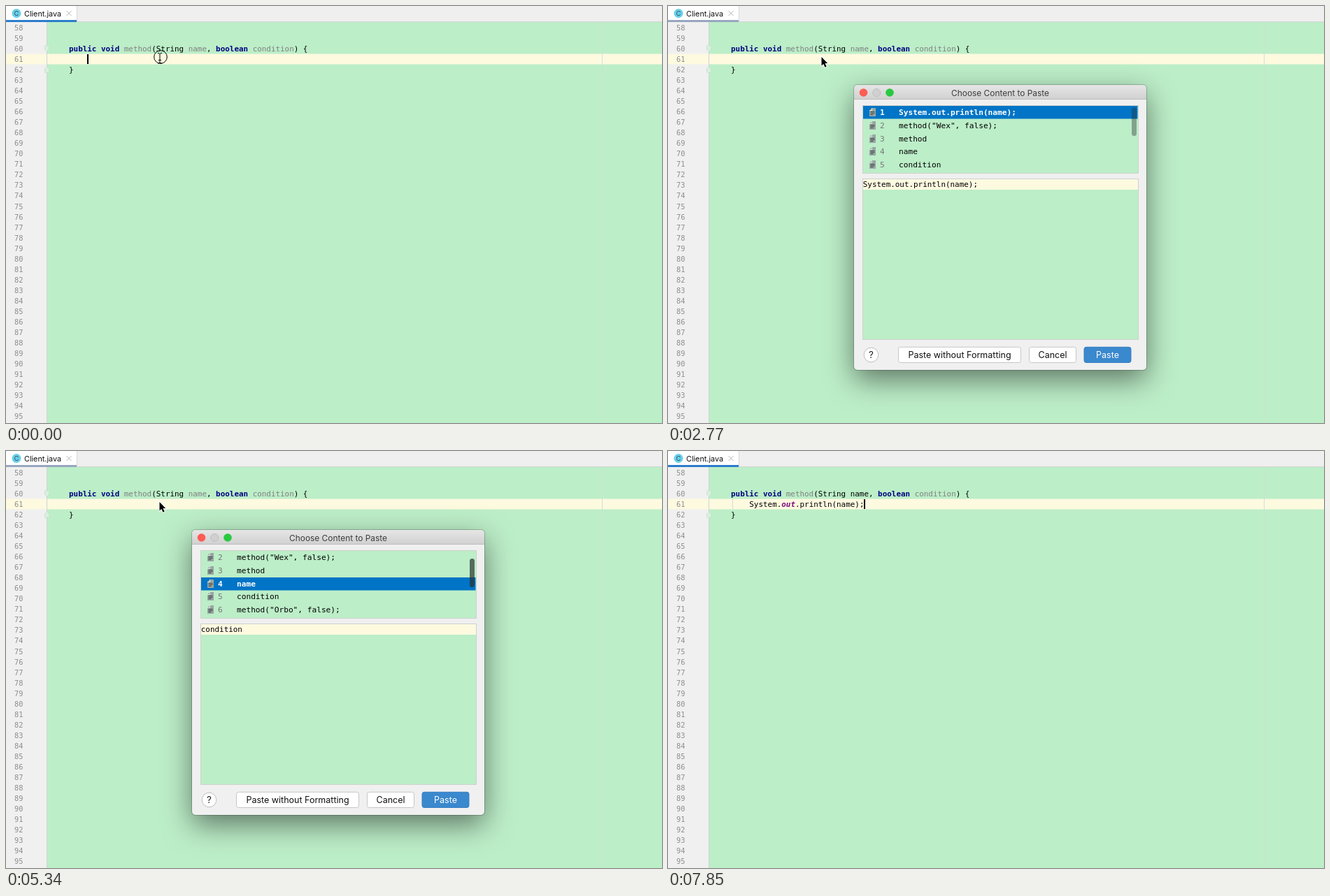
An HTML page with a canvas for the animation above (8 s loop, 938x597 px).

```html
<!DOCTYPE html>
<html lang="en">
<head>
<meta charset="utf-8">
<title>Paste from history</title>
<style>
  html, body { margin: 0; width: 100%; height: 100%; overflow: hidden; background: #bceec8; }
  canvas { display: block; }
</style>
</head>
<body>
<canvas id="stage" width="938" height="597"></canvas>
<script>
const LOOP = 8000, LAG = 90, BLINK = 540;
const W = 938, H = 597, LINE = 15.03, ROW = 18.75, VISIBLE = 5;
const MONO = '"DejaVu Sans Mono", monospace';
const UI = 'Inter, sans-serif';
const CODE = 10.92, LIST = 11.16;
const GREEN = '#bceec8', YELLOW = '#fefae0', GRAY = '#808080', NAVY = '#000080';

// Key moments of the story, in ms.
const OPEN = 1610, FILLED = 1780, LEAVE = 6930, CLOSED = 7110;
const PASTED = 7380, RESOLVED = 7500, POINTER_HIDDEN = 7770;
const DOWN = [2950, 3220, 3480, 3570, 3740];
const UP = [4900, 5340, 5510, 5690, 5860];

const ITEMS = [
  'System.out.println(name);', 'method("Wex", false);', 'method',
  'name', 'condition', 'method("Orbo", false);'
];

const screen = document.getElementById('stage').getContext('2d');
const layer = document.createElement('canvas');
layer.width = W;
layer.height = H;
const layerCtx = layer.getContext('2d');
let g = screen;

function selection(t) {
  const count = keys => keys.filter(key => key <= t).length;
  return count(DOWN) - count(UP);
}

// The list scrolls only as far as the selection pushes it.
function firstRow(t) {
  let first = 0;
  for (const key of [...DOWN, ...UP]) {
    if (key > t) break;
    const row = selection(key);
    first = Math.min(row, Math.max(first, row - VISIBLE + 1));
  }
  return first;
}

// The scroll thumb dims for a moment before it goes.
function thumbOpacity(t) {
  const spans = [[FILLED, 2860], [DOWN[4], 4360], [UP[1], 6570]];
  const span = spans.find(([from, to]) => t >= from && t < to);
  if (!span) return 0;
  return t < span[1] - LAG ? .7 : .4;
}

function dialogOpacity(t) {
  if (t < OPEN || t >= CLOSED) return 0;
  return Math.min(t - OPEN, CLOSED - LAG - 1 - t) < LAG && (t < OPEN + LAG || t >= CLOSED - LAG) ? .5 : 1;
}

function caretOn(t) {
  if (t >= CLOSED) return true;
  return t < OPEN && (t + BLINK / 2) % (2 * BLINK) < BLINK;
}

function rect(x, y, w, h, color) {
  g.fillStyle = color;
  g.fillRect(x, y, w, h);
}

function box(x, y, w, h, r, fill, stroke) {
  g.beginPath();
  g.roundRect(x, y, w, h, r);
  if (fill) { g.fillStyle = fill; g.fill(); }
  if (stroke) { g.strokeStyle = stroke; g.lineWidth = 1; g.stroke(); }
}

function disc(x, y, r, fill, stroke) {
  box(x - r, y - r, 2 * r, 2 * r, r, fill, stroke);
}

function shape(d, x, y, { fill, stroke, width = 1 }) {
  const path = new Path2D(d);
  g.save();
  g.translate(x, y);
  g.lineJoin = 'round';
  if (stroke) { g.strokeStyle = stroke; g.lineWidth = width; g.stroke(path); }
  if (fill) { g.fillStyle = fill; g.fill(path); }
  g.restore();
}

function text(str, x, y, size, color, { family = MONO, style = '', align = 'left' } = {}) {
  g.font = `${style} ${size}px ${family}`;
  g.textAlign = align;
  g.fillStyle = color;
  g.fillText(str, x, y);
  return x + g.measureText(str).width;
}

// Each part is [string, color, style].
function code(parts, x, y) {
  for (const [str, color = '#000', style] of parts) x = text(str, x, y, CODE, color, { style });
}

function tabBar(active) {
  rect(0, 0, W, 23, '#efefef');
  rect(0, 22, W, 1, '#d4d4d4');
  rect(0, 0, 101, 22, '#ffffff');
  rect(101, 0, 1, 22, '#d8d8d8');
  rect(0, 20, 101, 3, active ? '#2c7dcb' : '#98a6c1');
  disc(15, 10.5, 6.5, '#68cfea');
  text('C', 15, 14, 9.5, '#34505c', { family: UI, align: 'center' });
  text('Client.java', 26, 14.5, 10.8, '#111111', { family: UI });
  shape('M0 0l7 7m0 -7l-7 7', 86.5, 7, { stroke: '#b4b4b4' });
}

function foldMark(y, flip) {
  const s = flip ? -1 : 1;
  shape(`M-3 ${-4 * s}h6v${5 * s}l-3 ${3 * s}l-3 ${-3 * s}z`, 58.5, y, { fill: '#d9efde', stroke: '#b9dcc1' });
}

function editor(t) {
  rect(0, 23, 59, H - 23, '#f0f0f0');
  rect(59, 23, W - 59, H - 23, GREEN);
  rect(0, 68.5, W, 15, YELLOW);
  rect(58, 23, 1, H - 23, '#cfd3d0');
  rect(852, 23, 1, H - 23, '#d0dfd6');
  for (let n = 58; n <= 95; n++) text(n, 12, 35 + (n - 58) * LINE, 10.3, '#8e8e8e');
  foldMark(61);
  foldMark(91, true);

  const pasted = t >= PASTED, resolved = t >= RESOLVED;
  code([
    ['public void ', NAVY, 'bold'], ['method', GRAY], ['(String '],
    ['name', resolved ? '#000' : GRAY], [', '], ['boolean ', NAVY, 'bold'],
    ['condition', GRAY], [') {']
  ], 90, 65);
  code([['}']], 90, 95);

  if (pasted) {
    const out = resolved ? ['out', '#7a1080', 'italic bold'] : ['out'];
    code([['System.'], out, ['.println(name);']], 116.3, 80);
  }
  if (resolved) rect(92, 69, 1, 14, '#dcdccb');
  if (caretOn(t)) rect(pasted ? 280 : 116, 69, 2, 14, '#000');
}

function pageIcon(x, y) {
  shape('M3.5 0H9V12H0V3.5z', x, y, { fill: '#98a6a3' });
  shape('M0 3.5H3.5V0', x, y, { stroke: '#d5e3dc' });
  for (let i = 0; i < 3; i++) rect(x + 1.5, y + 5 + i * 2, i < 2 ? 6 : 4, 1, '#3f4746');
}

function panel(y, h) {
  rect(278, y, 395, h, '#cdd2ce');
  rect(279, y + 1, 393, h - 2, GREEN);
}

function historyList(t) {
  const selected = selection(t), first = firstRow(t);
  panel(142, 98);
  for (let i = 0; i < VISIBLE; i++) {
    const item = first + i, y = 143 + i * ROW, on = item === selected;
    const style = on ? 'bold' : '';
    if (on) rect(279, Math.round(y), 392.5, 18.5, '#0074c6');
    pageIcon(288, Math.round(y + 3));
    text(item + 1, 303, y + 13, LIST, on ? '#fff' : '#777', { style });
    text(ITEMS[item], 330, y + 13, LIST, on ? '#fff' : '#000', { style });
  }
  box(663, 145 + first * 9, 7, 41, 3.5, `rgba(40, 50, 48, ${thumbOpacity(t)})`);
}

function preview(t) {
  panel(247, 231);
  rect(279, 248, 393, 15, YELLOW);
  text(ITEMS[selection(t - LAG)], 278.8, 259, CODE, '#000');
}

function button(label, x, w, main) {
  box(x + .5, 488.3, w - 1, 22.2, 3, main ? '#3a88cd' : '#ffffff', main ? '#3680c4' : '#c6c6c6');
  text(label, x + w / 2, 504, 12.5, main ? '#fff' : '#111', { family: UI, align: 'center' });
}

function dialog(t) {
  g.save();
  g.shadowColor = 'rgba(0, 0, 0, .5)';
  g.shadowBlur = 40;
  g.shadowOffsetY = 14;
  box(266, 113, 418, 408, 5, '#f0f0f0');
  g.restore();

  const shade = g.createLinearGradient(0, 113, 0, 134);
  shade.addColorStop(0, '#e6e6e6');
  shade.addColorStop(1, '#d0d0d0');
  box(266, 113, 418, 21, [5, 5, 0, 0], shade);
  rect(266, 133, 418, 1, '#bdbdbd');
  box(265.5, 112.5, 419, 409, 5, null, 'rgba(0, 0, 0, .2)');
  ['#fe5c54', '#d0d0d0', '#29c940'].forEach((color, i) => disc(279.5 + i * 18.75, 124, 5.8, color));
  disc(298.25, 124, 5.5, null, '#c0c0c0');
  text('Choose Content to Paste', 475, 128.7, 11.9, '#3c3c3c', { family: UI, align: 'center' });
  if (t < FILLED) return;

  historyList(t);
  preview(t);
  disc(290.5, 499.5, 10.3, '#ffffff', '#bdbdbd');
  text('?', 290.5, 504.3, 13.5, '#222', { family: UI, align: 'center' });
  button('Paste without Formatting', 329, 176);
  button('Cancel', 516, 68);
  button('Paste', 594.5, 68, true);
}

function pointer(t) {
  if (t >= OPEN && t < LEAVE) {
    shape('M0 0V12.5L2.8 10L5 14.8L7.2 13.8L5 9.1L8.7 9z', 219.5, 73, { fill: '#000', stroke: '#fff', width: 2 });
  } else if (t < POINTER_HIDDEN) {
    shape('M-3 0h2l1 1l1 -1h2M0 1V13.5M-3 14.5h2l1 -1l1 1h2M-2 10h4', 220, 67.5, { stroke: '#000' });
  }
  if (t < LAG) disc(221, 73, 9.3, null, '#000');
}

function draw(t) {
  g = screen;
  tabBar(t < FILLED || t >= CLOSED - LAG);
  editor(t);
  const opacity = dialogOpacity(t);
  if (opacity) {
    g = layerCtx;
    g.clearRect(0, 0, W, H);
    dialog(t);
    g = screen;
    g.globalAlpha = opacity;
    g.drawImage(layer, 0, 0);
    g.globalAlpha = 1;
  }
  pointer(t);
}

const start = performance.now();
function tick() {
  draw((performance.now() - start) % LOOP);
  requestAnimationFrame(tick);
}
tick();
</script>
</body>
</html>
```
